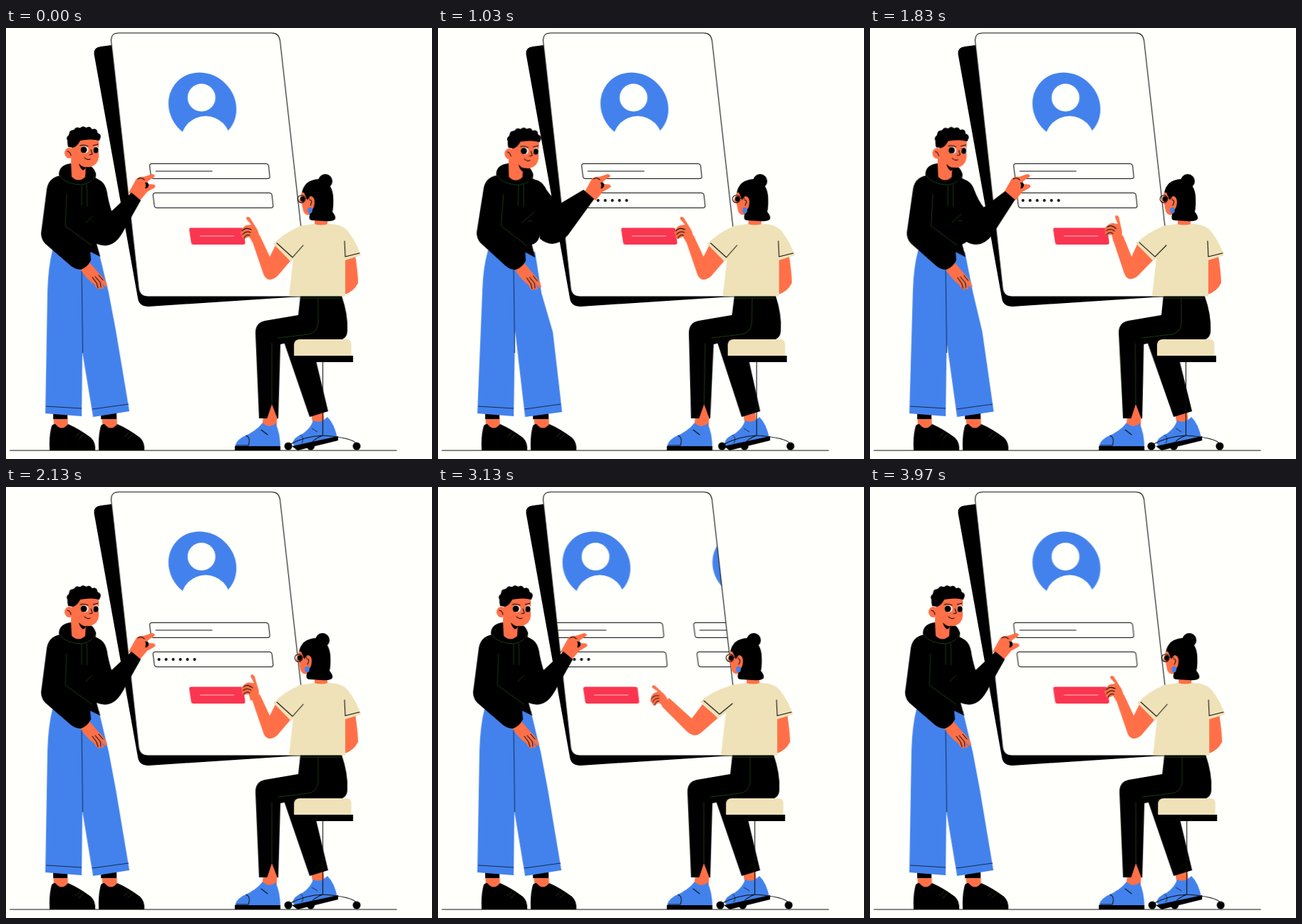
Animation of 598x605 px, one loop 4010 ms. Source, as an HTML page:

```html
<!DOCTYPE html>
<html lang="en">
<head>
<meta charset="utf-8">
<title>Sign-in form</title>
<style>
html, body { margin: 0; width: 100%; height: 100%; overflow: hidden; background: #fffffc; }
svg { display: block; width: 598px; height: 605px; }

.paper { fill: #fffffc; }
.skin { fill: #ff7048; }
.blue { fill: #4382ec; }
.cream { fill: #efe2b8; }
.ink { fill: none; stroke: #101010; stroke-width: 1.1; stroke-linecap: round; stroke-linejoin: round; }
.seam { fill: none; stroke: #183c10; stroke-width: 1; stroke-linecap: round; }
.navy { fill: none; stroke: #142d4c; stroke-width: 1; }

/* every part shares the same loop */
.lean, .head, .poke, .morph, .sway, .legs, .nod, .reach, .hand, .slide, .type, .press {
  animation: 4010ms ease-in-out infinite;
}

/* man */
.lean { animation-name: lean; transform-origin: 95px 470px; }
.head { animation-name: head; }
.poke { animation-name: poke; }
.morph { animation-name: morph; }
@keyframes lean { 0%, 3%, 52%, 100% { transform: none } 24.5%, 39% { transform: rotate(1.6deg) } }
@keyframes head { 0%, 3%, 52%, 100% { transform: none } 24.5%, 39% { transform: translate(3px, 1px) } }
@keyframes poke { 0%, 3%, 52%, 100% { transform: none } 24.5%, 39% { transform: translate(33px, 0) } }
@keyframes morph { 0%, 3%, 52%, 100% { d: var(--a) } 24.5%, 39% { d: var(--b) } }
.sleeve {
  --a: path("M122 212 Q138 211 142 228 Q145 245 149 257 L177 231 L190 242 L164 288 Q150 312 128 303 L118 240 Z");
  --b: path("M128 212 Q146 211 153 227 Q161 239 173 246 L205 227 L220 240 L183 291 Q164 312 144 296 L134 240 Z");
  d: var(--a);
}
.trousers {
  --a: path("M66 312 Q60 335 59 370 L56 541 L107 545 L108 455 L123 546 L174 538 L155 425 L145 372 L131 314 Z");
  --b: path("M71 312 Q64 335 63 370 L56 541 L107 545 L109 425 L123 546 L175 539 L162 427 L146 372 L137 314 Z");
  d: var(--a);
}

/* woman */
.sway { animation-name: sway; }
.legs { animation-name: legs; transform-origin: 0 548px; }
.nod { animation-name: nod; }
.reach { animation-name: reach; d: var(--a); }
.hand { animation-name: hand; transform-origin: 350px 290px; }
@keyframes sway {
  0%, 16.7%, 53%, 100% { transform: none }
  25.5% { transform: translate(2.5px, 0) }
  38%, 43% { transform: translate(-1.5px, 0) }
}
@keyframes legs {
  0%, 16.7%, 53%, 100% { transform: none }
  25.5% { transform: skewX(-.95deg) }
  38%, 43% { transform: skewX(.55deg) }
}
@keyframes nod {
  0%, 16.7%, 100% { transform: none }
  25.5% { transform: translate(1.5px, 0) }
  38%, 43% { transform: translate(-.5px, 0) }
  53%, 65% { transform: translate(-4px, 0) }
  78%, 84% { transform: translate(-5px, 0) }
  97% { transform: none }
}
@keyframes reach {
  0%, 27%, 53%, 65%, 97%, 100% { d: var(--a) }
  38%, 43% { d: var(--b) }
  78%, 84% { d: var(--c) }
}
@keyframes hand {
  0%, 27%, 97%, 100% { transform: none }
  38%, 43% { transform: rotate(20deg) }
  53%, 65% { transform: rotate(15deg) }
  78%, 84% { transform: translate(-33px, 8px) rotate(-15deg) scale(.9) }
}
.arm {
  --a: path("M379 305 L400 327 L382 348 Q376 354 369 353 Q364 351 362 345 L346 298 L357 291 L371 321 Z");
  --b: path("M377 303 L399 326 L378 347 Q372 353 365 352 Q360 350 358 343 L343 298 L357 291 L369 321 Z");
  --c: path("M372 305 L394 324 L370 345 Q364 350 358 348 Q354 347 350 343 L315 308 L325 296 L357 325 Z");
}
.cuff {
  --a: path("M414 278 Q392 287 376 303 L401 328 L424 302 Z");
  --b: path("M414 278 Q392 287 375 302 L400 327 L424 302 Z");
  --c: path("M414 278 Q386 286 369 301 L394 325 L424 302 Z");
}
.fold {
  --a: path("M381 302 L403 322 L418 305");
  --b: path("M380 301 L402 321 L418 305");
  --c: path("M374 300 L396 319 L414 304");
}

/* form */
.slide { animation-name: slide; }
.press { animation-name: press; fill: #fa3550; }
.type { animation-name: type; animation-timing-function: steps(6); }
@keyframes slide {
  0%, 66.1% { transform: none; animation-timing-function: cubic-bezier(.65, 0, .35, 1) }
  96%, 100% { transform: translate(-210.5px, 0) }
}
@keyframes press { 0%, 35%, 46%, 100% { fill: #fa3550 } 38%, 43% { fill: #ff3155 } }
@keyframes type { 0%, 3% { width: 0 } 22%, 100% { width: 60px } }
</style>
</head>
<body>
<svg viewBox="0.8 0 598 605" xmlns="http://www.w3.org/2000/svg">
  <defs>
    <path id="card" d="M148.5 19 Q147.500 7 159 7 H374 Q384 7 385.500 18 L424.500 365 Q426 377 416 377 H200 Q188.500 377 187 365 Z"/>
    <clipPath id="inside"><use href="#card"/></clipPath>
    <clipPath id="typed"><rect class="type" x="210" y="236" width="0" height="12"/></clipPath>
    <g id="form">
      <circle class="blue" r="47.500" transform="translate(276.500 110) skewX(5)"/>
      <circle class="paper" cx="275.200" cy="97.800" r="19.500"/>
      <circle class="paper" cx="281" cy="158" r="34.500"/>
      <path id="field" class="ink" d="M205.500 190.500 H365.500 Q369 190.500 369.500 194 L371 208 Q371.300 211.500 368 211.500 H208 Q204.700 211.500 204.300 208 L202.500 194 Q202.300 190.500 205.500 190.500 Z"/>
      <use href="#field" x="4.700" y="41"/>
      <path class="ink" d="M211 201 H290"/>
      <path class="press" d="M260.500 280.500 H331 Q334 280.500 334.300 283 L336.500 301 Q336.700 304 334 304 H263.500 Q261 304 260.600 301 L258 283.500 Q257.800 280.500 260.500 280.500 Z"/>
      <path d="M273 292 H321" stroke="#ffc3c8" stroke-width="1.200"/>
    </g>
    <path id="shoe" d="M62 593 Q61 575 64 562 Q65 555 70 556 Q79 567 88 556 Q104 563 120 575 Q127 582 126 593 Z"/>
  </defs>

  <path class="ink" d="M6.500 593 H549"/>

  <!-- card -->
  <path d="M124.500 37 Q123.500 27 134 26 L149 24 L200 377 H414 L201 391 Q188 391 186 380 Z"/>
  <use href="#card" class="paper"/>
  <g clip-path="url(#inside)">
    <g class="slide">
      <use href="#form"/>
      <use href="#form" x="210.500"/>
      <g clip-path="url(#typed)">
        <path d="M215.500 242 H266" fill="none" stroke="#000" stroke-width="4" stroke-linecap="round" stroke-dasharray="0 10"/>
      </g>
    </g>
  </g>
  <use href="#card" class="ink"/>

  <!-- man -->
  <g>
    <path class="skin" d="M67 540 H87 L88 562 H68 Z M134 540 H156 L157 562 H137 Z"/>
    <path d="M67 540 H87 V549 H67 Z M134 540 H156 V549 H134 Z"/>
    <use href="#shoe"/>
    <use href="#shoe" x="69"/>
    <path class="seam" d="M98 574 L104 568 M103 577 L109 571 M167 574 L173 568 M172 577 L178 571"/>
    <path class="blue morph trousers"/>
    <path class="navy" d="M107 338 L108.500 456 M57 531 L107 534 M122 535 L173 528"/>

    <g class="lean">
      <path class="skin" d="M104 337 L117 328 L131 344 Q140 352 143 362 Q141 365 138 361 L134 357 L138 364 Q137 368 133 365 L131 367 Q127 366 125 360 Q113 352 104 337 Z"/>
      <path class="ink" d="M126 349 L133 357 L134 364 M122 350 L128 358 L130 365 M131 347 L137 354"/>
      <path d="M80 207 Q61 208 58 226 L50 288 Q50 297 56 303 L92 334 Q98 339 106 339 Q115 336 120 326 L119 314 L133 321 L128 303 Q140 300 139 280 L143 235 Q140 213 122 209 Z"/>
      <path class="seam" d="M86 234 L84 278 L121 305 M141 236 L139 292 M113 273 L130 257 M122 270 L127 270"/>
      <path class="skin" d="M92 182 V208 Q102 219 113 210 V186 Z"/>
      <path d="M92 190 Q75 192 75 206 Q77 221 108 222 Q129 217 127 204 Q124 194 113 191 L112 209 Q102 218 93 209 Z"/>
      <path class="seam" d="M76 207 Q84 220 108 220 Q122 217 126 207 M107 221 V249 M114 219 L115 250"/>

      <g class="head">
        <path class="skin" d="M93 156 V183 Q96 191 104 193 Q112 196 119 195 Q130 192 131 181 V156 Z"/>
        <path d="M103 190 Q107 195 113 195.500 Q112 199 109 200 Q104 196 103 190 Z"/>
        <ellipse class="skin" cx="89.500" cy="175.500" rx="6.500" ry="7.500"/>
        <path class="ink" d="M87 173 Q91 174 92 179"/>
        <path d="M88 167 Q84 150 95 143 Q112 135 128 145 Q134 153 132 158 Q120 155 105 158 Q101 166 95 168 Z"/>
        <g>
          <circle cx="90.500" cy="155" r="4.500"/><circle cx="94" cy="148" r="4.500"/>
          <circle cx="101" cy="144" r="4.500"/><circle cx="109" cy="142.500" r="4.300"/>
          <circle cx="117" cy="143" r="4.300"/><circle cx="124.500" cy="146" r="4.500"/>
          <circle cx="129" cy="152.500" r="4.800"/>
        </g>
        <ellipse cx="111" cy="171" rx="5.500" ry="5" fill="#fff"/>
        <ellipse cx="127.500" cy="171" rx="4.200" ry="4.700" fill="#fff"/>
        <circle cx="110" cy="171" r="4.500"/>
        <ellipse cx="127" cy="171.500" rx="3.500" ry="4.300"/>
        <path class="ink" d="M105 165 Q110 163 116 166 M123 165 L130 163 M120 171 L122 177 L118 178 M111 182 Q114 186 119 184"/>
      </g>
    </g>

    <g class="poke">
      <path class="skin" d="M173 231 L183 213 Q187 208 194 209 L206 205 Q211 206 209 209 L200 215 L199 219 L208 219.500 Q213 222 208 225 L199 230 L189 242 Z"/>
      <path d="M196 217 Q201 216 201 221 Q200 226 196 225 Q198 221 196 217 Z"/>
      <path class="ink" d="M186 212 Q191 209 195 213"/>
    </g>
    <path class="morph sleeve"/>
  </g>

  <!-- woman -->
  <g>
    <path class="skin" d="M429 540 L446 536 L448 556 L432 560 Z M362 545 H381 V562 H360 Z"/>
    <path class="blue" d="M322 592 Q321 581 333 574 Q352 566 361 554 Q369 563 379 555 Q386 568 386 592 Z"/>
    <path d="M322 587 H386 V593 H322 Z"/>
    <path class="ink" d="M324 586 H341 Q345 576 338 572 M359 564 L368 571"/>
    <path class="blue" d="M403 583 Q404 575 418 569 Q428 562 432 551 Q442 556 452 546 Q462 556 466 576 L408 590 Z"/>
    <path d="M402 587 L467 573 V579 L410 593 Z"/>
    <path class="navy" d="M416 583 Q420 575 414 571 M430 562 L438 567"/>

    <g class="legs">
      <path d="M390 438 L427 546 L453 538 L429 438 Z"/>
      <path d="M414 376 H472 Q481 402 480 424 Q480 437 468 438 H412 L386 444 L383 548 H356 L351 430 Q350 414 364 411 L411 403 Z"/>
      <path class="skin" d="M374 528 L367 549 H382 Z"/>
      <path class="seam" d="M414 379 H470 M439 379 V413 Q438 428 425 430 L383 435 M374 443 V528"/>
    </g>

    <g class="sway">
      <path class="ink" d="M445.500 468 V572 M445.500 572 Q420 573 398 585 M445.500 572 Q432 577 429 584 M445.500 572 Q488 575 493 584"/>
      <circle cx="397" cy="587" r="5.500"/><circle cx="428.500" cy="587" r="5.500"/><circle cx="493" cy="587" r="5.500"/>
      <path class="cream" d="M405 461 V444 Q406 437 413 437 H479 Q485 437 485.500 444 V461 Z"/>
      <path d="M405 460 H488 V469 H405 Z"/>

      <path class="skin" d="M475 322 L491 319 Q495 345 495 358 Q489 370 476 374 Z"/>
      <path class="skin reach arm"/>
      <g class="hand">
        <path class="skin" d="M347 301 L342 293 L335 296 Q331 295 332 291 Q329 289 331 285 Q333 279 338 277 L345 276 L338 268 Q338 263 343 266 L351 279 Q356 285 357 296 Z"/>
        <path class="ink" d="M332 285 Q337 279 345 283 M333 290 Q338 284 344 287 M335 295 Q338 289 343 291"/>
      </g>
      <path class="skin" d="M434 262 H452 V280 H434 Z"/>
      <path class="cream reach cuff"/>
      <path class="cream" d="M412 278 L433 275 Q443 278 453 275 Q474 275 482 287 Q492 300 499 319 L477 326 V376.500 H398 L404 324 Z"/>
      <path class="ink reach fold"/>
      <path class="ink" d="M476 299 L477 321 L497 316"/>

      <g class="nod">
        <circle cx="449" cy="215" r="10"/>
        <path d="M416 232 Q419 213 440 212 Q458 216 460 235 Q461 250 459 258 Q464 264 463 268 Q460 272 448 271 L430 270 Q425 269 427 262 L422 240 Z"/>
        <path class="skin" d="M416 231 L412 242 L416 247 L418 257 Q421 264 427 262 L433 251 Q436 238 429 236 Q425 237 424 242 L419 231 Z"/>
        <path class="ink" d="M427 241 Q432 242 428 249"/>
        <ellipse cx="417" cy="240" rx="3" ry="3.800"/>
        <circle class="ink" cx="415.500" cy="240" r="5.300"/>
        <path class="ink" d="M420 239 L427 239"/>
        <ellipse class="blue" cx="427.500" cy="256" rx="3.300" ry="4.200"/>
      </g>
    </g>
  </g>
</svg>
</body>
</html>
```
